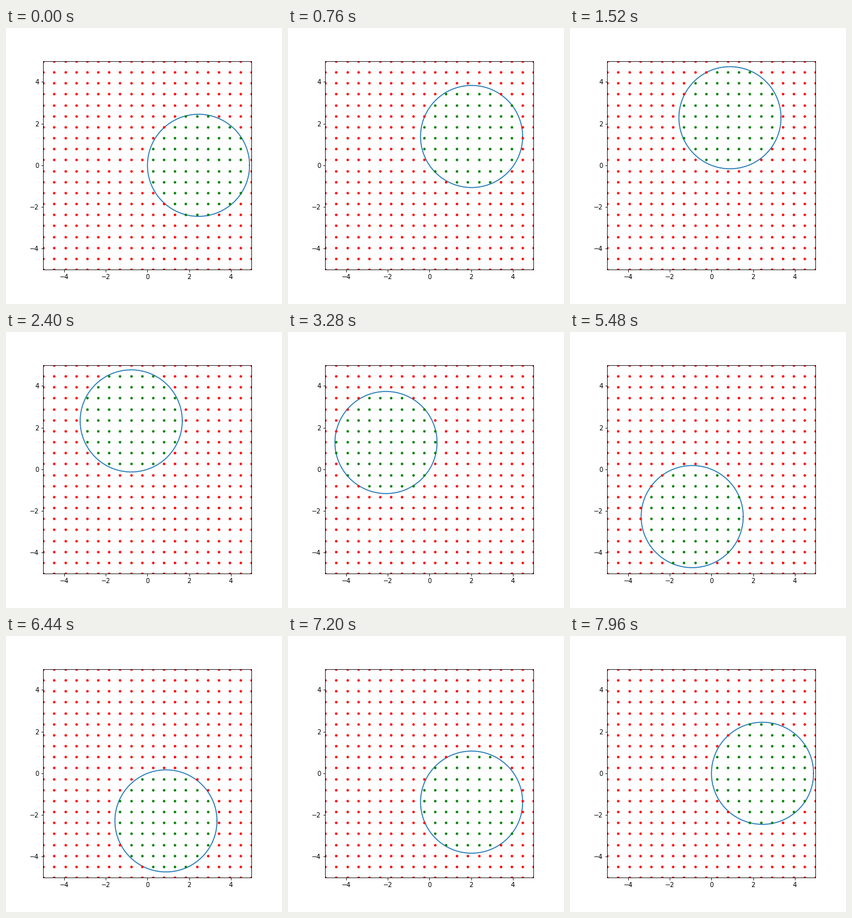
A matplotlib script for the animation above (8000 ms loop, 432 by 432 pixels).

```python
import numpy as np
import matplotlib.pyplot as plt
from matplotlib.animation import FuncAnimation

FRAMES = 200
RADIUS = 2.45
LIMIT = 5

fig, ax = plt.subplots(figsize=(6, 6), dpi=72)
fig.subplots_adjust(left=0.125, right=0.9, bottom=0.125, top=0.88)
ax.set_aspect("equal")
ax.set_xlim(-LIMIT, LIMIT)
ax.set_ylim(-LIMIT, LIMIT)

side = np.linspace(-LIMIT, LIMIT, 20)
gx, gy = (g.ravel() for g in np.meshgrid(side, side))

theta = np.linspace(0, 2 * np.pi, 100)
ring_x, ring_y = RADIUS * np.cos(theta), RADIUS * np.sin(theta)
orbit = np.linspace(0, 2 * np.pi, FRAMES)

circle, = ax.plot([], [], color="C0", lw=1.5)
outside, = ax.plot([], [], "r.")
inside, = ax.plot([], [], "g.")


def update(i):
    # The circle swings around the origin, always passing through it.
    cx, cy = RADIUS * np.cos(orbit[i]), RADIUS * np.sin(orbit[i])
    hit = np.hypot(gx - cx, gy - cy) < RADIUS
    circle.set_data(cx + ring_x, cy + ring_y)
    inside.set_data(gx[hit], gy[hit])
    outside.set_data(gx[~hit], gy[~hit])
    return circle, outside, inside


def init():
    return update(0)


anim = FuncAnimation(fig, update, frames=FRAMES, init_func=init,
                     interval=40, repeat=True, repeat_delay=0)
plt.show()
```
